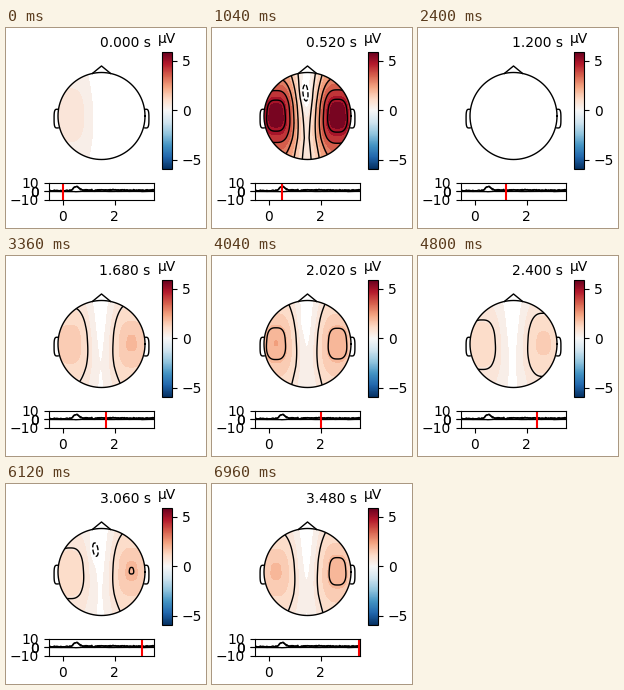
Recreate the animation shown at these times as a matplotlib script. Size 200 by 200 pixels, loop 7000 ms.

```python
import matplotlib.pyplot as plt
import numpy as np
from matplotlib.animation import FuncAnimation
from matplotlib.cm import ScalarMappable
from matplotlib.colors import Normalize
from matplotlib.patches import Circle

SIZE, FRAMES, STEP = 200, 175, 0.02
CX, CY, R = 95.5, 88, 43.5
VMAX = 5.9
LEVELS = np.linspace(-1.2, VMAX, 7, endpoint=False)[1:]

plt.rcParams.update({"font.family": "DejaVu Sans", "font.size": 10})
fig = plt.figure(figsize=(2, 2), dpi=100, facecolor="white")


def add_axes(x0, y0, x1, y1):
    return fig.add_axes([x0 / SIZE, 1 - y1 / SIZE,
                         (x1 - x0) / SIZE, (y1 - y0) / SIZE])


# Electrode signals: slow drift, one evoked peak, a short silence, noise
LEAD = 27
PEAK, SILENCE = 0.52, 1.2
DRIFT = [0, 1, 1.68, 2.4, 3.06, 3.48]
rng = np.random.default_rng(4)
times = np.arange(-LEAD, FRAMES + 1) * STEP


def pulse(at, width):
    return np.exp(-((times - at) / width) ** 2)


def noise(amount):
    """Smoothed noise that vanishes at the drift points and events."""
    n = np.convolve(rng.normal(0, amount, times.size), [0.2, 0.6, 0.2], "same")
    still = np.sort(DRIFT + [PEAK, SILENCE])
    return n - np.interp(times, still, np.interp(still, times, n))


def signal(drift, gain):
    rest = np.interp(times, DRIFT, drift) * (1 - pulse(SILENCE, 0.06))
    return np.abs(rest + gain * pulse(PEAK, 0.14) + noise(0.6))


left = signal([0.8, 1.4, 1.6, 1.16, 1.16, 1.75], 4.5)
right = signal([0.1, 1.4, 1.75, 1.38, 1.8, 2.05], 4.95)
mid = np.abs(0.75 * pulse(PEAK, 0.14) + 0.5 * pulse(3.06, 0.1) + noise(0.15))

# Scalp map
gx, gy = np.meshgrid(np.arange(50, 142, 0.5), np.arange(43, 134, 0.5))


def lobe(x0):
    u = np.abs(gx - x0) / 34
    v = 0.64 * np.tanh(np.abs(gy - 85.5) / 34)
    d = np.cbrt(u ** 3 + v ** 3)
    return 0.5 + 0.5 * np.cos(np.pi * np.minimum(d, 1))


FLOOR = 0.05 * np.clip((gy - 70) / 40, 0, 1)
LOBE_L, LOBE_R = lobe(64) + FLOOR, lobe(125.5) + FLOOR


def field(i):
    k = i + LEAD
    mx = 93.5 - 1.6 * times[k] + 0.12 * (gy - 66)
    dip = np.exp(-((gx - mx) / 4.2) ** 2 - ((gy - 65.5) / 11) ** 2)
    return left[k] * LOBE_L + right[k] * LOBE_R - mid[k] * dip


# Colour steps widen with the value; the lowest one is white
n = np.arange(11)
edges = 0.2 + 0.3 * n + 0.02 * n ** 2
cmap = plt.get_cmap("RdBu_r")
centres = np.r_[0, (edges[:-1] + edges[1:]) / 2, 5.6]
colors = cmap(0.5 + centres / (2 * VMAX))[:, :3]
colors[0] = 1


def paint(z):
    return colors[np.digitize(z, edges)]


head = fig.add_axes([0, 0, 1, 1])
head.axis("off")
image = head.imshow(paint(field(0)), extent=(49.75, 141.75, 133.75, 42.75),
                    aspect="auto", interpolation="nearest")
head.set(xlim=(0, SIZE), ylim=(SIZE, 0))
disc = Circle((CX, CY), R, fill=False, ec="none")
head.add_patch(disc)
image.set_clip_path(disc)


def outline(x, y):
    head.plot(CX + R * np.asarray(x), CY - R * np.asarray(y),
              color="k", lw=1, zorder=5)


def soft(v):
    return np.sign(v) * np.abs(v) ** 0.6


a = np.linspace(0, 2 * np.pi, 101)
outline(np.cos(a), np.sin(a))
dx = np.deg2rad(12)
dy = np.sqrt(1 - dx ** 2)
outline([-dx, 0, dx], [dy, 1.15, dy])
a = np.deg2rad(np.linspace(-100, 100, 41))
for side in (-1, 1):
    outline(side * (1.02 + 0.07 * soft(np.cos(a))), -0.06 + 0.215 * soft(np.sin(a)))
clock = head.text(144.5, 19, "", ha="right", va="baseline")

# Colour bar
bar = add_axes(156, 23.9, 166, 140.9)
fig.colorbar(ScalarMappable(Normalize(-VMAX, VMAX), cmap), cax=bar,
             ticks=[-5, 0, 5])
bar.set_title("µV", fontsize=10, pad=6.6)

# Channel traces with time cursor
trace = add_axes(42.9, 154.9, 147.9, 171.9)
for s in (left, right, -0.5 * mid):
    trace.plot(times, s, color="k", lw=1)
trace.set(xlim=(-0.53, 3.5), ylim=(-10, 10), xticks=[0, 2],
          yticks=[-10, 0, 0, 10])
cursor = trace.axvline(0, color="r", lw=1.5, zorder=2.4)

lines = []


def update(i):
    z = field(i)
    image.set_data(paint(z))
    while lines:
        lines.pop().remove()
    shown = [v for v in LEVELS if z.min() < v < z.max()]
    if shown:
        cs = head.contour(gx, gy, z, levels=shown, colors="k", linewidths=1)
        cs.set_clip_path(disc)
        lines.append(cs)
    t = i * STEP
    clock.set_text(f"{t:.3f} s")
    cursor.set_xdata([t, t])
    return [image, clock, cursor]


anim = FuncAnimation(fig, update, frames=FRAMES, interval=40,
                     repeat=True, repeat_delay=0, blit=False)
plt.show()
```
